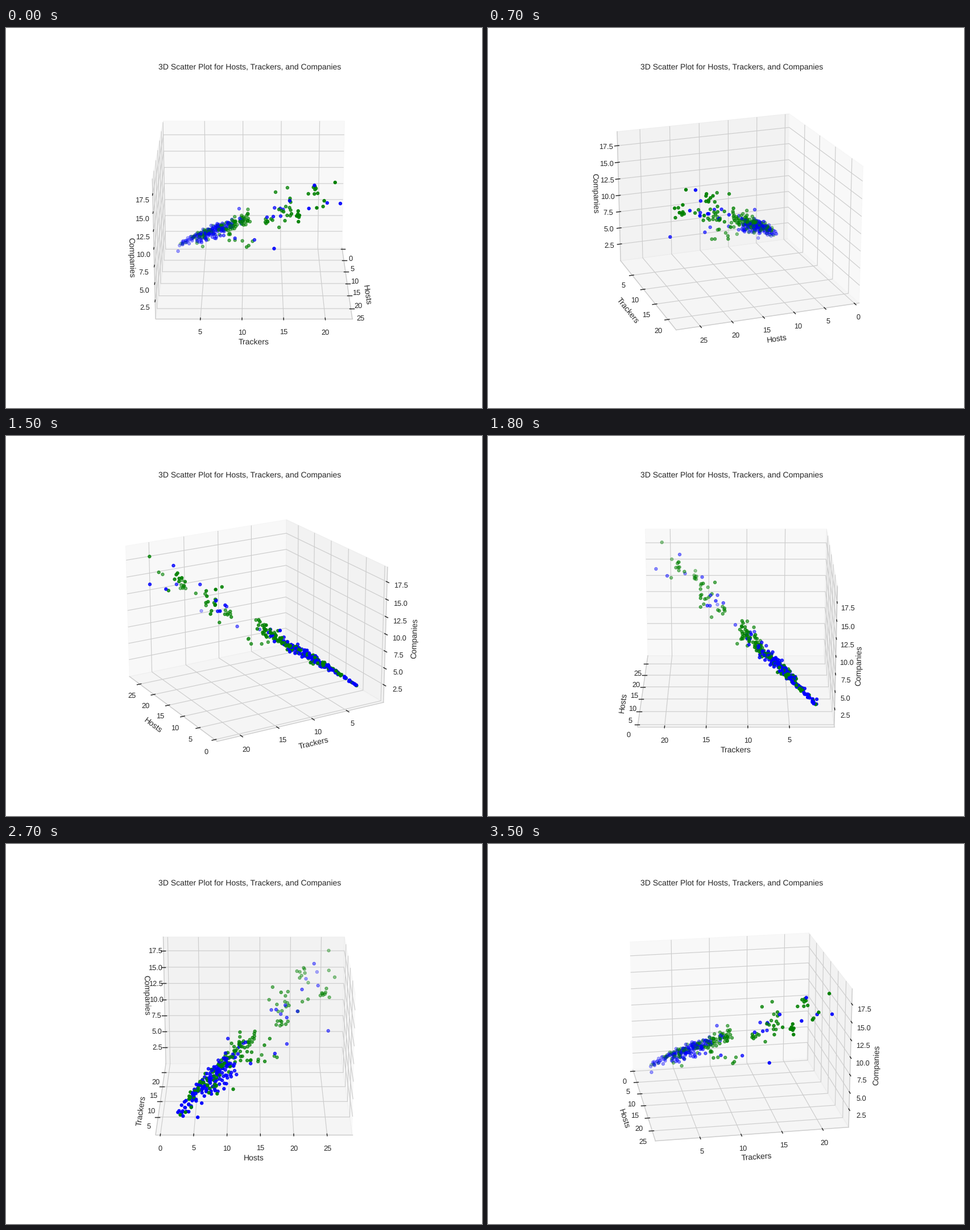
Write a matplotlib script that moves like this. It is 837 by 669 pixels and loops after 3.6 s.

```python
import numpy as np
import matplotlib.pyplot as plt
from matplotlib.animation import FuncAnimation

FRAMES = 36
INK, LINE = "0.15", "0.8"

plt.rcParams.update({
    "font.family": "Liberation Sans",
    "font.size": 12,
    "text.hinting": "none",
    "axes.titlesize": 12, "axes.labelsize": 12,
    "xtick.labelsize": 11, "ytick.labelsize": 11,
    "text.color": INK, "axes.labelcolor": INK,
    "xtick.color": INK, "ytick.color": INK,
    "xtick.major.width": 1.25, "ytick.major.width": 1.25,
    "axes.edgecolor": LINE, "axes.linewidth": 1.25,
    "grid.color": LINE, "grid.linewidth": 1.0, "grid.linestyle": "-",
})

rng = np.random.default_rng(12)


def trend(n, low, mode, high):
    """Sites on the main trend: companies <= trackers <= hosts, wider as they grow."""
    trackers = rng.triangular(low, mode, high, n)
    hosts = trackers + 0.2 + rng.gamma(2, 0.3 + 0.09 * trackers)
    companies = 0.6 + 0.8 * trackers + rng.normal(0, 0.05 * trackers)
    companies = np.clip(companies, 1.1, np.maximum(trackers, 1.1))
    return np.column_stack([hosts, trackers, companies])


def clump(n, center, spread):
    return rng.normal(center, spread, (n, 3))


# Columns: hosts, trackers, companies
green = np.vstack([
    trend(120, 1.3, 7.8, 12.3),
    clump(6, (15.5, 10, 6.4), (1.3, 0.9, 0.3)),
    clump(7, (18, 13, 10.4), (1, 0.4, 0.5)),
    clump(16, (19.2, 15, 12.2), (1.2, 0.6, 1.2)),
    clump(8, (25.6, 16.8, 13.4), (0.6, 0.2, 0.5)),
    clump(7, (21.8, 18.5, 15.9), (0.9, 0.5, 0.4)),
    [(26.1, 21, 18.3), (26.1, 19.75, 15.75),
     (27, 18.85, 15.05), (22.8, 19.75, 13.9)],
])
blue = np.vstack([
    trend(155, 1.1, 5.6, 10.5),
    clump(6, (18.6, 13.6, 11.5), (1.2, 0.9, 1.2)),
    [(24.3, 21.75, 14.8), (22.45, 20.25, 14.3), (23.65, 18.65, 17.15),
     (24.3, 18, 14.1), (21.65, 15.75, 14.35), (25.8, 13.85, 8.9),
     (19.2, 11.5, 7.9), (10, 9.55, 9.5)],
])

fig = plt.figure(figsize=(10, 7.993), dpi=83.7)
fig.subplots_adjust(bottom=0.1101, top=0.8808)
ax = fig.add_subplot(projection="3d")
ax.scatter(*np.vstack([green, blue]).T,
           c=["green"] * len(green) + ["blue"] * len(blue))
ax.set_title("3D Scatter Plot for Hosts, Trackers, and Companies")
ax.set(xlabel="Hosts", ylabel="Trackers", zlabel="Companies")
ax.set_xticks(np.arange(0, 26, 5))
ax.set_yticks(np.arange(5, 21, 5))
ax.set_zticks(np.arange(2.5, 18, 2.5))
ax.set(xlim=(-0.72, 28.78), ylim=(-0.385, 23.245), zlim=(-0.11, 19.59))


def turn(i):
    # A tiny nudge settles which side wall shows in head-on views
    ax.view_init(elev=20, azim=i * 360 / FRAMES + 1e-6 * (1 - i / 9))
    return []


anim = FuncAnimation(fig, turn, frames=FRAMES, init_func=lambda: turn(0),
                     interval=100, repeat=True, repeat_delay=0)
plt.show()
```
